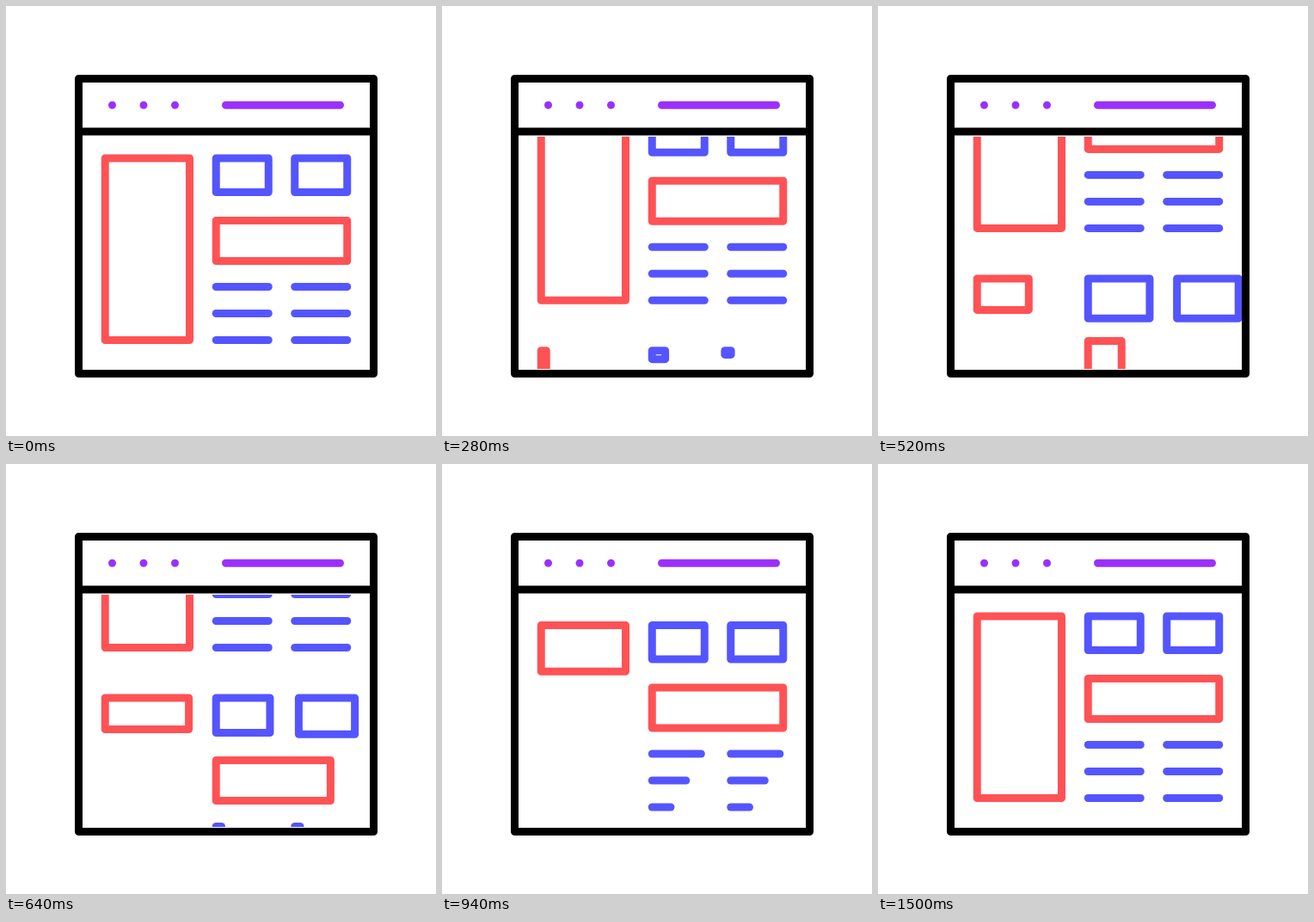
An HTML page for the animation above (1680 ms loop, 500 by 500 pixels).

```html
<!DOCTYPE html>
<html lang="en">
<head>
<meta charset="utf-8">
<title>Page layout scroll</title>
<style>
  html, body { margin: 0; width: 100%; height: 100%; overflow: hidden; background: #fff; }
  svg { display: block; width: 100vw; height: 100vh; }
  path { fill: none; stroke-width: 9; stroke-linecap: round; stroke-linejoin: round; }
  .ink { stroke: #000; }
  .purple { stroke: #9b30fc; }
  .red { stroke: #ff5255; }
  .blue { stroke: #5455ff; }
</style>
</head>
<body>
<svg viewBox="0 0 500 500">
  <clipPath id="view"><rect x="89" y="152" width="334" height="270"/></clipPath>
  <path class="ink" d="M84.5 84.5H427.5V427.5H84.5ZM84.5 146H427.5"/>
  <path class="purple" d="M123.5 115.3h.01M160 115.3h.01M196.5 115.3h.01M255.5 115.3H388.5"/>
  <g clip-path="url(#view)">
    <g id="leaving"></g>
    <g id="entering"></g>
  </g>
</svg>
<script>
const LOOP = 1680, SCROLL = 1068, PAGE = 270;
const COLS = [244.25, 335.75], ROWS = [326.5, 357.5, 388.5];
const leaving = document.getElementById('leaving');
const entering = document.getElementById('entering');

const box = (x, y, w, h) => `M${x} ${y}h${w}v${h}h${-w}Z`;
const line = (x, y, w) => `M${x} ${y}h${w}`;

function ease(t, start, length) {
  const x = Math.min(1, Math.max(0, (t - start) / length));
  return x * x * (3 - 2 * x);
}

// Grows from a to peak, then settles at end.
function grow(t, a, peak, end, start, rise, fall) {
  return a + (peak - a) * ease(t, start, rise) + (end - peak) * ease(t, start + rise, fall);
}

const pop = (t, start) => grow(t, 0, 1.18, 1, start, 316, 184);

// Each part: colour and its outline at time t.
const parts = [
  ['red', t => box(115.25, 177,
    6 + 92.25 * ease(t, 347, 312),
    grow(t, 36.5, 231, 211.5, 875, 360, 265))],
  ['blue', t => {
    const s = pop(t, 187);
    return box(COLS[0], 177, 61 * s, 39.5 * s);
  }],
  ['blue', t => {
    const s = pop(t, 219);
    return box(COLS[1] + grow(t, -9, 12, 0, 219, 316, 184), 177, 61 * s, 39.5 * s);
  }],
  ['red', t => box(COLS[0], 249.5, grow(t, 4, 178, 152.5, 430, 316, 184), 47)],
  ...ROWS.flatMap((y, i) => COLS.map(x =>
    ['blue', t => line(x, y, grow(t, 6, 71.5, 61, 624 + 86 * i, 455, 250))]))
];

function addPath(parent, colour) {
  const path = document.createElementNS('http://www.w3.org/2000/svg', 'path');
  path.setAttribute('class', colour);
  return parent.appendChild(path);
}

for (const [colour, shape] of parts) addPath(leaving, colour).setAttribute('d', shape(LOOP));
const paths = parts.map(([colour]) => addPath(entering, colour));

function draw(t) {
  const y = PAGE * ease(t, 0, SCROLL);
  leaving.setAttribute('transform', `translate(0 ${-y})`);
  entering.setAttribute('transform', `translate(0 ${PAGE - y})`);
  parts.forEach(([, shape], i) => paths[i].setAttribute('d', shape(t)));
}

const begin = performance.now();
function tick() {
  draw((performance.now() - begin) % LOOP);
  requestAnimationFrame(tick);
}
tick();
</script>
</body>
</html>
```
